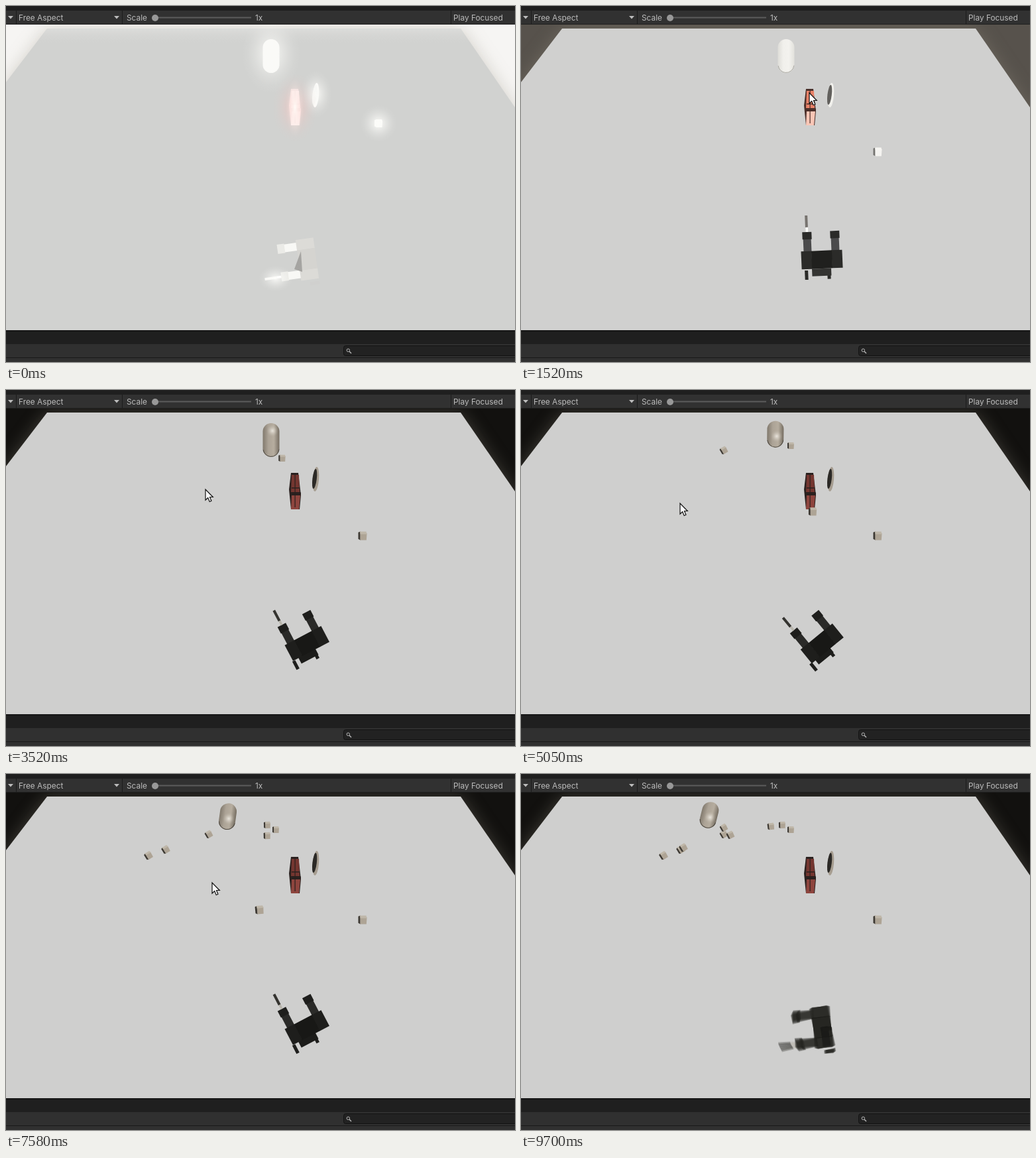
Write an HTML page with a canvas that moves like this. It is 768x537 px and loops after 9770 ms.

```html
<!DOCTYPE html>
<html lang="en">
<head>
<meta charset="utf-8">
<title>Game view</title>
<style>
  html, body { margin: 0; width: 100%; height: 100%; overflow: hidden; background: #202020; }
  svg, canvas { position: absolute; left: 0; top: 0; display: block; }
  text { font: 11.85px Inter, sans-serif; fill: #bcbcbc; }
</style>
</head>
<body>
<svg width="768" height="537" viewBox="0 0 768 537">
  <rect width="768" height="537" fill="#1f1f1f"/>
  <rect y="7" width="768" height="20" fill="#313131"/>
  <path d="M15.5 7v20M175.5 7v20M671.5 7v20" stroke="#1c1c1c"/>
  <path d="M3 15h8l-4 4.5zM163 15h8l-4 4.5z" fill="#bcbcbc"/>
  <path d="M225 17.5h145" stroke="#5c5c5c" stroke-width="2"/>
  <circle cx="225" cy="18" r="5" fill="#989898"/>
  <text x="19" y="22">Free Aspect</text>
  <text x="182" y="22">Scale</text>
  <text x="376" y="22">1x</text>
  <text x="675" y="22">Play Focused</text>
  <rect y="489" width="768" height="2" fill="#161616"/>
  <rect y="510" width="768" height="27" fill="#303030"/>
  <rect y="530" width="768" height="1" fill="#1a1a1a"/>
  <rect x="509.5" y="512.5" width="270" height="15" rx="3" fill="#222" stroke="#121212"/>
  <g fill="none" stroke="#b8b8b8"><circle cx="516.3" cy="519.3" r="2.2"/><path d="M518 521l3 3" stroke-width="1.4"/></g>
</svg>
<canvas id="view" width="768" height="537"></canvas>
<script>
const g = document.getElementById('view').getContext('2d');
const LOOP = 9770, START = 720, END = 9700, STEP = 66.6;
const PIVOT = [454, 382], REST = -98 * Math.PI / 180;

const clamp = (v, lo = 0, hi = 1) => Math.min(hi, Math.max(lo, v));
const mix = (a, b, u) => a + (b - a) * u;
const smooth = u => u * u * (3 - 2 * u);
const easeOut = u => 1 - (1 - u) ** 3;

// Pointer strokes: start time and destination
const strokes = [
  [950, 434, 130], [2500, 395, 140], [3080, 300, 149], [3900, 288, 153], [4620, 239, 170],
  [5200, 226, 186], [6780, 385, 150], [7140, 310, 163], [7850, 262, 165], [8350, 310, 155], [9150, 700, 512]
];
function pointerAt(t) {
  return strokes.reduce(([x, y], [t0, tx, ty]) => {
    const u = smooth(clamp((t - t0) / 420));
    return [mix(x, tx, u), mix(y, ty, u)];
  }, [540, 300]);
}
function aimAt(t) {
  const [x, y] = pointerAt(t);
  return Math.atan2(x - 447, (PIVOT[1] - y) * 1.2);
}

// Shots: launch time, point of impact, then how far the cube rolls on
const shots = [
  [3050, 417, 104, -10, -20], [4150, 306, 91], [4600, 440, 183, -46, -106], [5250, 241, 114],
  [6250, 215, 123], [7110, 395, 94, -18, -15], [7340, 316, 92], [8150, 245, 111], [8700, 306, 81]
];
function shotAt([t0, x, y, dx = 0, dy = 0], t) {
  const a = aimAt(t0), s = Math.sin(a), c = Math.cos(a);
  const fly = clamp((t - t0) / 450), roll = easeOut(clamp((t - t0 - 450) / 900));
  return [
    mix(PIVOT[0] + 20 * c + 44 * s, x, fly) + dx * roll,
    mix(PIVOT[1] + 20 * s - 44 * c, y, fly) + dy * roll
  ];
}

// Colours run from overexposed (0) through half adapted (1) to settled (2)
let k = 0;
function tone(list, e = k) {
  const c = list.split(' '), i = Math.min(1, Math.floor(e));
  const ch = (s, n) => parseInt(s.substr(n, 2), 16);
  return 'rgb(' + [0, 2, 4].map(n => Math.round(mix(ch(c[i], n), ch(c[i + 1], n), e - i))) + ')';
}
function poly(color, ...p) {
  g.fillStyle = color;
  g.beginPath();
  for (let i = 0; i < p.length; i += 2) g.lineTo(p[i], p[i + 1]);
  g.fill();
}
function box(color, x, y, w, h) {
  g.fillStyle = color;
  g.fillRect(x, y, w, h);
}
function ellipse(color, x, y, rx, ry, rot = 0) {
  g.fillStyle = color;
  g.beginPath();
  g.ellipse(x, y, rx, ry, rot, 0, 7);
  g.fill();
}
function glow(x, y, rx, ry, rgb, alpha) {
  if (alpha <= 0) return;
  g.save();
  g.translate(x, y);
  g.scale(rx, ry);
  const r = g.createRadialGradient(0, 0, 0, 0, 0, 1);
  for (let i = 0; i <= 5; i++) r.addColorStop(i / 5, `rgba(${rgb},${alpha * (1 - i / 5) ** 1.6})`);
  ellipse(r, 0, 0, 1, 1);
  g.restore();
}
function placed(x, y, angle, paint) {
  g.save();
  g.translate(x, y);
  g.rotate(angle);
  paint();
  g.restore();
}

function drawGround(bloom) {
  box(tone('f6f5f3 57524c 12110f', Math.min(2, k + 3 * Math.max(0, k - 1))), 0, 28, 768, 461);
  g.save();
  g.shadowColor = 'rgba(150,143,130,.35)';
  g.shadowBlur = 24;
  poly(tone('d1d2d0 d0d0cf cfcfce'), 62, 34, 686, 34, 768, 153, 768, 520, 0, 520, 0, 115);
  g.restore();
  const top = g.createLinearGradient(0, 34, 0, 56);
  top.addColorStop(0, `rgba(235,235,233,${bloom * .4})`);
  top.addColorStop(1, 'rgba(220,220,218,0)');
  poly(top, 62, 34, 686, 34, 702, 56, 46, 56);
}

function drawCapsule(t) {
  const p = clamp((t - 3740) / 5960), tip = easeOut(clamp((t - 3740) / 300));
  const h = mix(51, 40, tip);
  placed(400 - 116 * p ** 1.3, 75.5 - 7.5 * tip - 6 * p, (17 * p - 3 * tip) * Math.PI / 180, () => {
    const f = g.createLinearGradient(-12.5, 0, 12.5, 0);
    ['fafaf8 deddd8 81796d', 'fafaf8 f1f0ec aca396', 'fafaf8 f3f2ee b6ad9f', 'fafaf8 e2e1dc 756d61']
      .forEach((c, i) => f.addColorStop(i / 3, tone(c)));
    g.fillStyle = f;
    g.beginPath();
    g.roundRect(-12.5, -h / 2, 25, h, 12.4);
    g.fill();
    g.strokeStyle = tone('f8f8f6 aaa8a2 4c473f');
    g.beginPath();
    g.arc(0, h / 2 - 12.5, 12, .1, 3);
    g.stroke();
    glow(2, -14 + tip * 17, 9, 9, '245,242,235', (k - 1) * .8);
  });
}

function drawBlock() {
  const dark = tone('f2e8e6 4b302b 2a211f');
  poly(dark, 430, 125, 441, 125, 444, 150, 445, 159, 443, 180, 430, 180, 427, 150);
  poly(tone('fbf4f2 e98269 743630'), 431, 128, 442, 128, 443, 154, 430, 154);
  poly(tone('fcf6f4 f9c6b6 8e453e'), 431, 159, 444, 159, 442, 180, 430, 180);
  box(dark, 429, 154.5, 16, 4.5);
  box(dark, 435.5, 125, 1.2, 52);
  box(dark, 431, 147, 12, 1.5);
}

function drawDisc() {
  ellipse(tone('fbfbf9 f1f0ec a69d90'), 467.5, 134.5, 4.6, 18.5, .08);
  ellipse(tone('f4f4f2 62605d 2b2926'), 465.6, 134, 3.2, 15, .12);
}

function drawCube([x, y], angle) {
  const h = 5 + Math.max(0, y - 84) * .011;
  placed(x, y, angle, () => {
    poly(tone('fafaf8 747370 3d3933'), -h, -h * .8, -h * .5, -h, -h * .5, h, -h, h * .75);
    poly(tone('fafaf8 f4f3f0 aea495'), -h * .55, -h * .6, h, -h * .6, h * .9, h, -h * .55, h);
    poly(tone('fafaf8 f6f5f2 bfb7a9'), -h * .65, -h, h * .85, -h, h, -h * .4, -h * .5, -h * .4);
  });
}
function drawCubes(t, bloom) {
  const fall = easeOut(clamp((t - START) / 700));
  const first = [mix(562, 538, fall), mix(177, 220, fall)];
  drawCube(first, 0);
  glow(...first, 28, 28, '252,252,249', bloom);
  for (const s of shots) {
    if (t < s[0]) continue;
    const p = shotAt(s, t);
    drawCube(p, clamp((p[0] - 400) / 180, -.55, 0));
  }
}

function drawRobot(angle) {
  const sides = [-1, 1];
  const dark = '2b2b29 1e1e1c', hull = tone('dcdbd7 ' + dark);
  // Underside hangs below the hull in screen space
  placed(PIVOT[0], PIVOT[1] + 14, angle, () => {
    for (const s of sides) box(tone('d0d0ce ' + dark), s * 17 - 9, 2, 5, 14);
    box(tone('cfcecb 343432 1c1c1a'), -15, 0, 29, 11);
  });
  placed(...PIVOT, angle, () => {
    for (const s of sides) {
      box(tone('f8f8f5 4b4b4c 2a2a28'), s * 21 - 6, -35, 12, 24);
      box(tone('ebebe7 ' + dark), s * 21 - 7, -42, 14, 11);
      box(hull, s * 23 - 8, -13, 16, 27);
    }
    box(tone('d5d4d0 20201e 181816'), -15.5, -13, 31, 27);
    box(tone('f7f7f4 77736f 34332f'), -23, -67, 4, 18);
    box(tone('ffffff fafaf8 b8b5ac'), -22.5, -49, 3.5, 7);
  });
}

function drawPointer(x, y) {
  placed(x + .5, y + .5, 0, () => {
    g.lineWidth = 1.2;
    g.strokeStyle = '#111';
    poly('#fff', .5, .5, .5, 16.5, 4.2, 13, 6.7, 19, 9.4, 17.8, 7, 12, 11.8, 12);
    g.closePath();
    g.stroke();
  });
}

function draw(now) {
  const raw = now % LOOP, done = raw >= END;
  const t = done ? END : raw < START ? 0 : START + Math.floor((raw - START) / STEP) * STEP;
  const shown = t >= 850 && !done;
  k = clamp((t - START) / 800, 0, 2);
  const bloom = Math.max(0, 1 - k);

  g.clearRect(0, 0, 768, 537);
  g.save();
  g.beginPath();
  g.rect(0, 28, 768, 461);
  g.clip();
  drawGround(bloom);
  drawCapsule(t);
  drawDisc();
  drawBlock();
  drawCubes(t, bloom);
  glow(400, 72, 44, 60, '250,250,247', bloom);
  glow(468, 133, 24, 36, '250,250,247', bloom);
  glow(436, 153, 34, 52, '255,190,185', bloom * .6);
  glow(436, 153, 14, 44, '255,250,246', bloom);

  if (done) {
    // Smear of the snap back to the resting pose
    g.globalAlpha = .25;
    for (let i = -4; i <= 4; i++) drawRobot(REST + i * .022);
    g.globalAlpha = 1;
  } else if (shown) {
    drawRobot(aimAt(t));
  } else {
    drawRobot(REST);
    poly('#a5a4a1', 445, 370, 447, 401, 435, 397);
    glow(407, 411, 26, 20, '255,255,252', .85);
  }
  g.restore();
  if (shown) drawPointer(...pointerAt(t));
}

const t0 = performance.now();
(function tick() {
  draw(performance.now() - t0);
  requestAnimationFrame(tick);
})();
</script>
</body>
</html>
```
